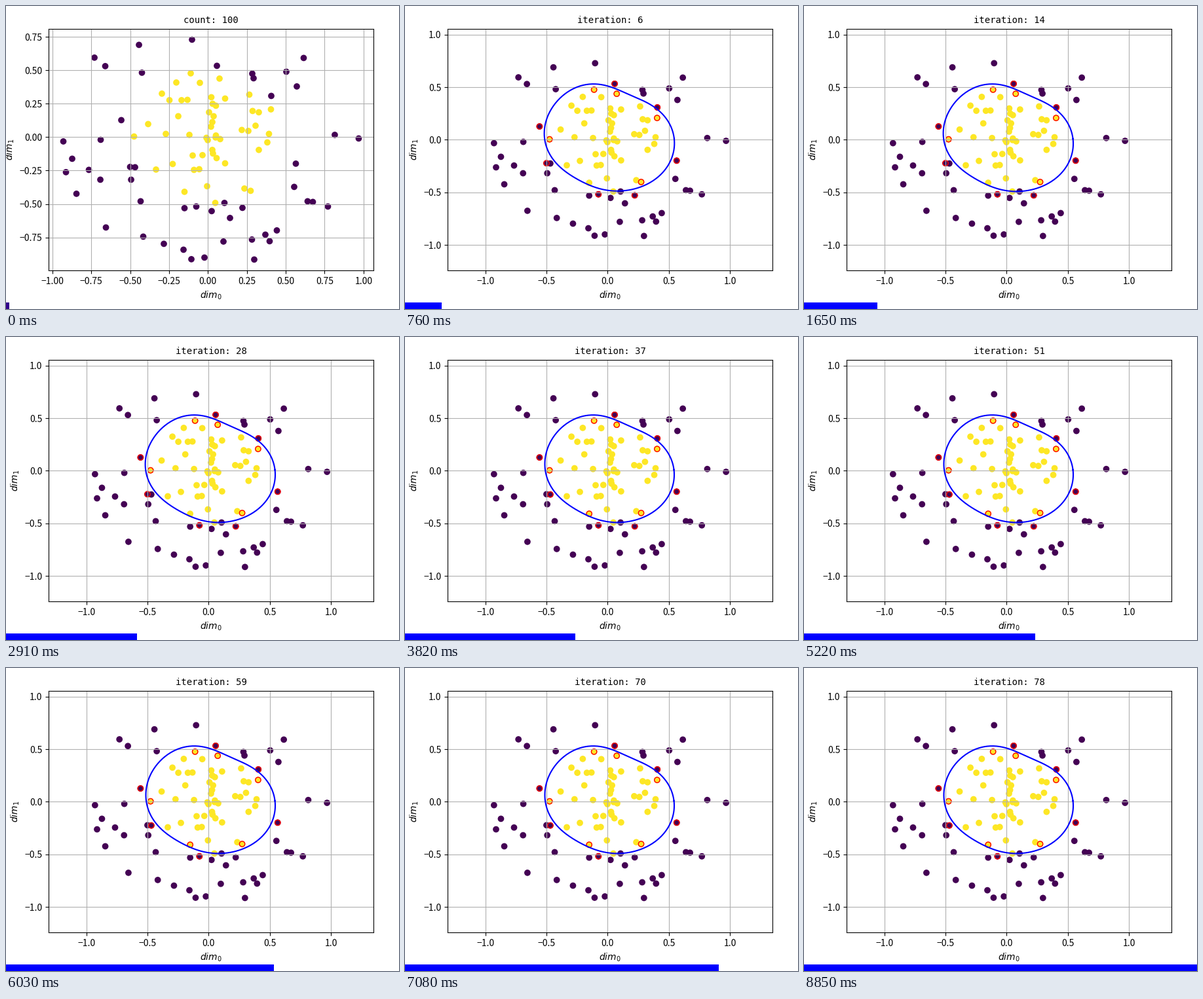
Write a matplotlib script that moves like this. It is 600 px wide and 463 px high and loops after 8.92 s.

```python
import numpy as np
import matplotlib.pyplot as plt
from matplotlib.animation import FuncAnimation
from matplotlib.patches import Rectangle

W, H, DPI = 600, 463, 100
LOOP, FRAMES = 8920, 129
LAST = 78

# Samples on a pixel canvas, converted to data units below.
OUTER = [
    (135, 79), (151.5, 92), (203, 59.5), (207.5, 102), (284, 51.5),
    (322, 91.5), (376, 103.5), (378, 110.5), (405, 137.5), (428, 100.5),
    (444, 123), (454.5, 79.5), (502, 197), (538.5, 202.5), (442.5, 241),
    (440, 276.5), (460.5, 298.5), (468.5, 299.5), (491.5, 306.5), (413.5, 343),
    (396, 349.5), (402.5, 359.5), (375.5, 357), (379, 387.5), (332, 360),
    (342, 324), (361, 308.5), (333.5, 301), (314, 313.5), (290.5, 306.5),
    (272.5, 309), (303, 384.5), (283, 387), (271, 372.5), (241, 363.5),
    (209.5, 352.5), (152.5, 338.5), (205.5, 298.5), (191, 265.5), (189.5, 246),
    (197, 246.5), (176, 174.5), (144.5, 204.5), (144, 265.5), (126.5, 250.5),
    (101, 233.5), (91.5, 254), (87.5, 207), (107.5, 287),
]
INNER = [
    (282, 103), (260, 117), (296, 117.5), (326, 111), (238, 134),
    (249.5, 144), (268, 144), (277, 143.5), (313.5, 139.5), (334.5, 141.5),
    (315.5, 149.5), (320.5, 152.5), (371.5, 135.5), (310, 162.5), (317, 168.5),
    (376.5, 160.5), (386, 162.5), (404.5, 158), (263, 168.5), (217, 180.5),
    (195.5, 199.5), (244, 195.5), (280, 197), (315, 177.5), (313, 184.5),
    (381, 183), (360, 189.5), (370, 191), (401.5, 195.5), (399, 208.5),
    (320.5, 198), (320, 201), (306, 201.5), (308, 205), (327, 203.5),
    (386, 220), (315, 220), (316, 225.5), (300, 228), (285, 228.5),
    (321.5, 232.5), (334.5, 240.5), (254.5, 241.5), (229, 250), (287, 250.5),
    (295, 249.5), (307, 275.5), (272.5, 284), (364, 279), (373.5, 282.5),
    (319.5, 301),
]
EDGE = [
    (211.5, 203), (213, 188), (218.5, 170), (227, 153), (238, 139),
    (251, 128.5), (268, 121.5), (286, 119.8), (304, 121.8), (321, 126.5),
    (345, 136), (366, 147.5), (386, 160), (400, 175), (409, 192),
    (411.5, 208), (409, 224), (402, 242), (391, 257), (374, 271),
    (354, 279.5), (330, 283), (308, 281.5), (285, 276), (262, 265),
    (243, 251), (228, 235), (217, 219),
]


def to_data(px, origin, scale):
    return (np.array(px) - origin) / (scale[0], -scale[1])


outer = to_data(OUTER, (308.3, 200.5), (237.6, 204.4))
inner = to_data(INNER, (308.3, 200.5), (237.6, 204.4))
points = np.vstack([outer, inner])
lo, hi = points.min(0), points.max(0)

# Support vectors: always present, and those that swap during training.
core = np.vstack([outer[[5, 8, 14, 29, 41]], inner[[0, 3, 17, 20, 49]]])
early, late = outer[39], np.vstack([outer[40], inner[47]])
dropped = outer[26]


def harmonics(a, n=5):
    waves = [f(m * a) for m in range(1, n + 1) for f in (np.cos, np.sin)]
    return np.stack([np.ones_like(a)] + waves, axis=1)


CENTER = np.array([310, 203])
offset = np.array(EDGE) - CENTER
coef = np.linalg.lstsq(harmonics(np.arctan2(offset[:, 1], offset[:, 0])),
                       np.hypot(*offset.T), rcond=None)[0]
theta = np.linspace(0, 2 * np.pi, 361)
radius = harmonics(theta) @ coef


def boundary(it):
    settle = np.exp(-it / 2.5)
    r = radius + settle * (4 * np.cos(2 * theta + 1) - 5 * np.cos(theta - 2))
    if it >= 36:
        r = r - 0.9 * np.exp(-((theta - np.pi) ** 2) / 0.2)
    px = CENTER + np.stack([r * np.cos(theta), r * np.sin(theta)], axis=1)
    return to_data(px, (309.3, 204.5), (186.6, 160.6))


def support(it):
    parts = [core, late if it >= 36 else early]
    if it < 52:
        parts.append(dropped)
    return np.vstack(parts)


plt.rcParams["font.family"] = "Noto Sans CJK JP"
fig = plt.figure(figsize=(W / DPI, H / DPI), dpi=DPI)
ax = fig.add_axes([65 / W, 58.8 / H, 496 / W, 369.6 / H])
ax.grid(True)
ax.set_xlabel("$dim_0$")
ax.set_ylabel("$dim_1$")
title = ax.set_title("", fontfamily="DejaVu Sans Mono", fontsize=10)
ax.scatter(*points.T, c=["#440154"] * len(outer) + ["#fde725"] * len(inner))
rings = ax.scatter([], [], s=36, facecolors="none", edgecolors="r", linewidths=1)
curve, = ax.plot([], [], color="blue", lw=1.5)
bar = fig.add_artist(Rectangle((0, 0), 0, 10, lw=0, transform=None))


def set_view(pad, step, digits):
    ticks = np.arange(-1, 1 + step / 2, step)
    margin = pad * (hi - lo)
    for axis, a, b in zip((ax.xaxis, ax.yaxis), lo - margin, hi + margin):
        axis.set_ticks(ticks[(ticks > a) & (ticks < b)])
        axis.set_major_formatter(
            lambda v, _: f"{v:.{digits}f}".replace("-", "\u2212"))
    ax.set_xlim(lo[0] - margin[0], hi[0] + margin[0])
    ax.set_ylim(lo[1] - margin[1], hi[1] + margin[1])


def update(k):
    it = min(int(np.floor(0.7 * k - 1.3)), LAST)
    training = it >= 0
    curve.set_visible(training)
    rings.set_visible(training)
    if training:
        set_view(0.2, 0.5, 1)
        title.set_text(f"iteration: {it}")
        curve.set_data(*boundary(it).T)
        rings.set_offsets(support(it))
    else:
        set_view(0.05, 0.25, 2)
        title.set_text(f"count: {len(points)}")
    bar.set_width(round(W * (k + 1) / FRAMES))
    bar.set_facecolor("blue" if training else "#33008c")
    return []


anim = FuncAnimation(fig, update, frames=FRAMES, interval=LOOP / FRAMES,
                     repeat=True, repeat_delay=0)
plt.show()
```
